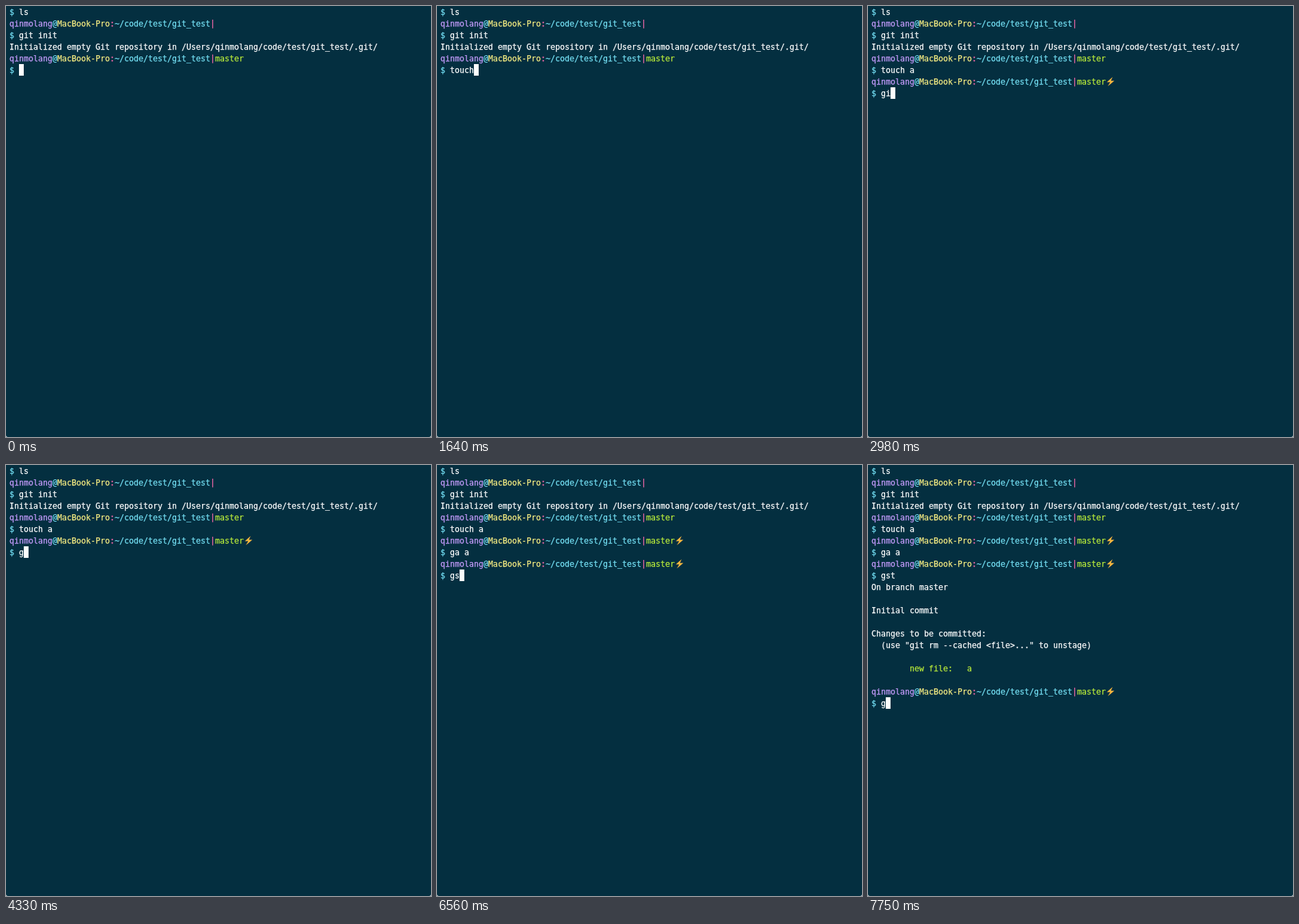
Animation, 622 px wide and 631 px high, one loop 8000 ms. Source, as an HTML page:

```html
<!DOCTYPE html>
<html lang="en">
<head>
<meta charset="utf-8">
<title>Terminal session</title>
<style>
  html, body { margin: 0; width: 100%; height: 100%; overflow: hidden; background: #cfd8dc; }
  svg {
    display: block; width: 622px; height: 631px;
    background: #042f40; border-radius: 0 0 3px 3px;
  }
  text {
    font: 11.63px "DejaVu Sans Mono", monospace;
    white-space: pre;
    color: #fdfdfd;
  }
  tspan { fill: currentColor; stroke: currentColor; stroke-width: .25px; }
  .user { color: #c49bfb; }
  .cyan { color: #74dff3; }
  .host { color: #f3e981; }
  .mark { color: #fb69ac; }
  .green { color: #b8ea3a; }
  .cursor { fill: #fdfdfd; }
  .bolt { fill: #fdb93f; }
</style>
</head>
<body>
<svg id="screen" viewBox="0 0 622 631"></svg>
<script>
const LOOP = 8000, LEFT = 5, CELL = 7, ROW = 17, BASELINE = 13;
const USER = "qinmolang";
const screen = document.getElementById("screen");

function add(parent, tag, attrs = {}, text = "") {
  const el = document.createElementNS("http://www.w3.org/2000/svg", tag);
  for (const key in attrs) el.setAttribute(key, attrs[key]);
  el.textContent = text;
  return parent.appendChild(el);
}

const output = [];

// Each segment is [text, class, vertical shift]; the line appears at the given time.
function line(time, row, ...segments) {
  const group = add(screen, "g", { transform: `translate(${LEFT} ${row * ROW})` });
  const text = add(group, "text", { y: BASELINE });
  for (const [content, style = "", dy = 0] of segments) add(text, "tspan", { class: style, dy }, content);
  output.push({ time, group });
  return group;
}

function prompt(time, row, branch = "", dirty = false) {
  const group = line(time, row, [USER, "user"], ["@", "cyan"], ["MacBook-Pro", "host"],
    [":", "mark"], ["~/code/test/git_test", "cyan"], ["|", "mark", -1], [branch, "green", 1]);
  if (dirty) {
    add(group, "path", { class: "bolt", d: "M353 2L344.5 9.5L349.5 9.5L346 15.5L355.5 7.5L350.5 7.5Z" });
  }
}

line(0, 0, ["$", "cyan"], [" ls"]);
prompt(0, 1);
line(0, 2, ["$", "cyan"], [" git init"]);
line(0, 3, [`Initialized empty Git repository in /Users/${USER}/code/test/git_test/.git/`]);
prompt(0, 4, "master");
prompt(2390, 6, "master", true);
prompt(5220, 8, "master", true);
line(7010, 10, ["On branch master"]);
line(7010, 12, ["Initial commit"]);
line(7010, 14, ["Changes to be committed:"]);
line(7010, 15, ['  (use "git rm --cached <file>..." to unstage)']);
line(7010, 17, ["        new file:   a", "green"]);
prompt(7010, 19, "master", true);

// [time, row, typed text]; without text the cursor waits at the line start.
const keys = [
  [0, 5, ""], [1200, 5, "t"], [1340, 5, "tou"], [1490, 5, "touc"],
  [1640, 5, "touch"], [1790, 5, "touch "], [1940, 5, "touch a"], [2240, 6],
  [2390, 7, ""], [2830, 7, "g"], [2980, 7, "gi"], [4330, 7, "g"],
  [4480, 7, "ga"], [4630, 7, "ga "], [4930, 7, "ga a"], [5070, 8],
  [5220, 9, ""], [6560, 9, "gs"], [6710, 9, "gst"], [6860, 10],
  [7010, 20, ""], [7750, 20, "g"]
];

const inputs = new Map();
for (const [time, row, typed] of keys) {
  if (typed === "") inputs.set(row, line(time, row, ["$", "cyan"], [" "], [""]).querySelector("tspan:last-child"));
}
const cursor = add(screen, "rect", { class: "cursor", width: CELL, height: ROW });

function draw(now) {
  const time = now % LOOP;
  for (const item of output) item.group.setAttribute("visibility", time >= item.time ? "visible" : "hidden");
  for (const [start, row, typed] of keys) {
    if (start > time) break;
    const waiting = typed === undefined;
    if (!waiting) inputs.get(row).textContent = typed;
    cursor.setAttribute("x", LEFT + CELL * (waiting ? 0 : typed.length + 2));
    cursor.setAttribute("y", row * ROW);
  }
}

const origin = performance.now();
function tick() {
  draw(performance.now() - origin);
  requestAnimationFrame(tick);
}
tick();
</script>
</body>
</html>
```
